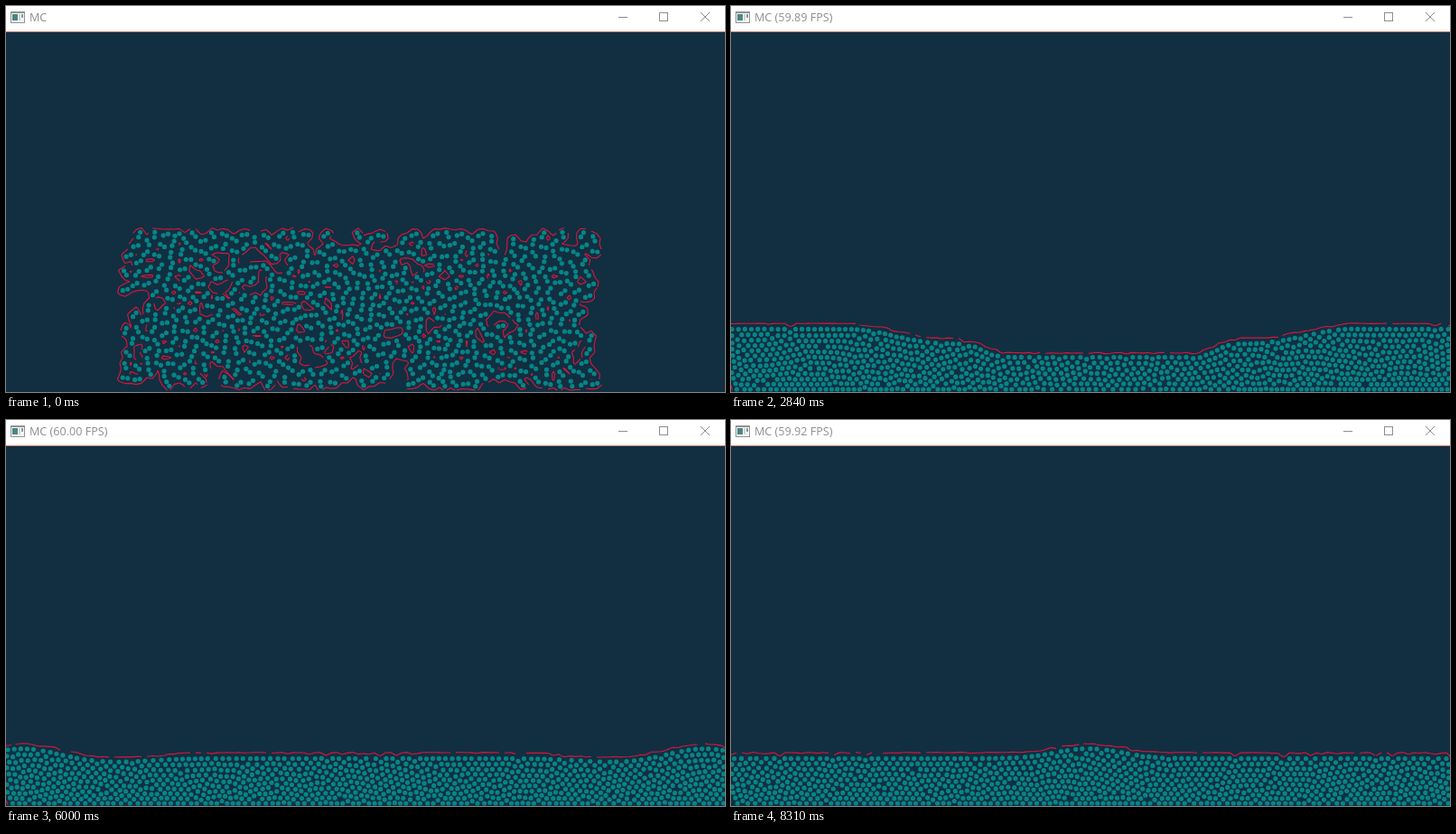
Animation of 796x427 px, one loop 8390 ms. Source, as an HTML page with a canvas:

```html
<!DOCTYPE html>
<html lang="en">
<head>
<meta charset="utf-8">
<title>MC</title>
<style>
  html, body { margin: 0; width: 100%; height: 100%; overflow: hidden; background: #112f41; }
  canvas { position: absolute; left: 0; top: 0; display: block; }
  #title {
    position: absolute; left: 26px; top: 4px; line-height: 18px; white-space: pre;
    font-family: "Open Sans", "Noto Sans", sans-serif; font-size: 12.6px; color: #8e8e8e;
  }
</style>
</head>
<body>
<canvas id="stage" width="796" height="427"></canvas>
<div id="title">MC</div>
<script>
const W = 796, H = 427, LOOP = 8390, STEP = 76.92, FRAMES = 109;
const FLOOR = 424, PAIRS = 520, N = PAIRS * 2, LIFT = 4.5;
const IMPACT = 1230, MEET = 3920, CROSSING = 4390, GRAVITY = 655;
const ctx = document.getElementById('stage').getContext('2d');
const title = document.getElementById('title');

let seed = 20177;
function rand(a = 0, b = 1) {
  seed = (seed * 1664525 + 1013904223) >>> 0;
  return a + (b - a) * seed / 4294967296;
}
const clamp = (v, a, b) => Math.max(a, Math.min(b, v));
const mix = (a, b, u) => a + (b - a) * u;
const bell = (x, mid, width) => Math.exp(-(((x - mid) / width) ** 2));
function smooth(a, b, v) {
  const u = clamp((v - a) / (b - a), 0, 1);
  return u * u * (3 - 2 * u);
}

// Water depth in three stages: the block collapses, the waves
// rebound from the walls, then a pair of crests crosses the tank.
function collapse(x, t) {
  const u = Math.min(t / IMPACT, 1), d = Math.abs(x - 392);
  const pile = mix(176, 95, u ** 1.6) * clamp((mix(264, 300, u) - d) / mix(1, 150, u), 0, 1);
  const film = 28 * u * clamp((mix(264, 430, Math.min(1, t / 850)) - d) / 30, 0, 1);
  const jet = 80 * smooth(850, IMPACT, t) * Math.exp(-Math.min(x, W - x) / 16);
  return Math.max(pile, film) + jet;
}
function rebound(x, t) {
  const d = Math.abs(x - 408), front = Math.max(0, 398 - 0.166 * (t - IMPACT));
  return 40 + 15 / (1 + Math.exp((front - d) / 7)) + 16 * smooth(front + 40, front + 150, d);
}
function crossing(x, t) {
  const d = Math.abs(x - 396), phase = (t - MEET) / CROSSING;
  const c = 398 * Math.abs(((phase * 2 + 9) % 2) - 1);
  const clash = bell(t, MEET, 350);
  const crest = 4 + 7 * Math.abs(Math.cos(phase * Math.PI * 2)) + 19 * clash;
  return 54 + crest * bell(d, c, 50 - 14 * clash) - 4 * bell(d, c - 100, 55);
}
function depth(x, t) {
  let h = t < 2000 ? collapse(x, t) : 0;
  if (t > IMPACT) h = mix(h, rebound(x, t), smooth(IMPACT, 2000, t));
  if (t > 2840) h = mix(h, crossing(x, t), smooth(2840, 3750, t));
  return h;
}

function waterLine(t) {
  const top = new Float64Array(W + 1), sum = new Float64Array(W + 2);
  const rough = 5 * bell(t, IMPACT, 420);
  for (let x = 0; x <= W; x++) {
    const h = depth(x, t);
    const wobble = Math.sin(x * 0.19 + 1) + Math.sin(x * 0.083) + Math.sin(x * 0.31 + 2);
    const y = FLOOR - h + LIFT + wobble * rough * clamp(h / 90, 0, 1);
    top[x] = Math.min(y, FLOOR - 0.01);
    sum[x + 1] = sum[x] + FLOOR - top[x];
  }
  const total = sum[W + 1];
  return { top, sum: sum.map(v => v / total) };
}
const topAt = (line, x) => line.top[clamp(Math.round(x), 0, W)];

// Share of the water left of x, and its inverse.
function share(line, x) {
  const i = clamp(Math.floor(x), 0, W);
  return mix(line.sum[i], line.sum[i + 1], x - i);
}
function place(line, q) {
  let lo = 0, hi = W + 1;
  while (hi - lo > 1) {
    const m = (lo + hi) >> 1;
    if (line.sum[m] <= q) lo = m; else hi = m;
  }
  return lo + (q - line.sum[lo]) / Math.max(line.sum[hi] - line.sum[lo], 1e-9);
}

// One pass of pushing neighbours apart inside a box.
function spread(px, py, reach, gapAt, area) {
  const n = px.length, cols = Math.ceil(W / reach) + 2, rows = Math.ceil(H / reach) + 2;
  const head = new Int32Array(cols * rows).fill(-1), next = new Int32Array(n);
  const cell = i => Math.floor(py[i] / reach) * cols + Math.floor(px[i] / reach);
  const keepIn = i => {
    px[i] = clamp(px[i], area.left, area.right);
    py[i] = clamp(py[i], area.top, area.bottom);
  };
  for (let i = 0; i < n; i++) {
    const c = cell(i);
    next[i] = head[c];
    head[c] = i;
  }
  for (let i = 0; i < n; i++) {
    const c = cell(i), gap = gapAt(py[i]);
    for (let r = -1; r <= 1; r++) for (let s = -1; s <= 1; s++) {
      const k = c + r * cols + s;
      if (k < 0 || k >= head.length) continue;
      for (let j = head[k]; j >= 0; j = next[j]) {
        if (j <= i) continue;
        const dx = px[j] - px[i], dy = py[j] - py[i], d = Math.hypot(dx, dy) || 0.01;
        if (d >= gap) continue;
        const f = 0.28 * (gap - d) / d;
        px[i] -= dx * f; py[i] -= dy * f;
        px[j] += dx * f; py[j] += dy * f;
      }
    }
    keepIn(i);
  }
  for (let i = 0; i < n; i++) keepIn(i);
}

// Loose block of evenly spread pairs.
function fillBlock(px, py) {
  const area = { left: 132, right: 652, top: 253, bottom: 418 };
  const mx = new Float64Array(PAIRS).map(() => rand(area.left, area.right));
  const my = new Float64Array(PAIRS).map(() => rand(area.top, area.bottom));
  for (let n = 0; n < 14; n++) spread(mx, my, 14, () => 13.5, area);
  for (let i = 0; i < N; i++) {
    const m = i >> 1;
    if (i % 2) {
      px[i] = 2 * mx[m] - px[i - 1];
      py[i] = 2 * my[m] - py[i - 1];
    } else {
      const a = rand(0, Math.PI * 2);
      px[i] = mx[m] + Math.cos(a) * 2.8;
      py[i] = my[m] + Math.sin(a) * 2.8;
    }
  }
}

function flow() {
  const out = [], px = new Float64Array(N), py = new Float64Array(N);
  const order = Array.from(px, (_, i) => i);
  const tank = { left: 1, right: W - 1.5, top: 40, bottom: FLOOR };
  const gapAt = y => Math.min(8, 6.3 + 0.014 * (FLOOR - y));
  const inside = x => clamp(x, tank.left, tank.right);
  fillBlock(px, py);
  let line = waterLine(0);
  out.push({ px: px.slice(), py: py.slice(), line });
  for (let k = 1; k < FRAMES; k++) {
    const now = waterLine(k * STEP);
    for (let i = 0; i < N; i++) {
      const x = inside(place(now, share(line, px[i])));
      const grow = (FLOOR - topAt(now, x)) / (FLOOR - topAt(line, px[i]));
      py[i] = FLOOR - (FLOOR - py[i]) * clamp(grow, 0.5, 1.8);
      px[i] = x;
    }
    order.sort((a, b) => px[a] - px[b]);
    order.forEach((i, n) => {
      px[i] = inside(mix(px[i], place(now, (n + 0.5) / N), 0.2));
    });
    for (let n = 0; n < 10; n++) {
      spread(px, py, 8, gapAt, tank);
      for (let i = 0; i < N; i++) {
        py[i] += Math.max(0, topAt(now, px[i]) - py[i]) * 0.4;
      }
    }
    line = now;
    out.push({ px: px.slice(), py: py.slice(), line });
  }
  return out;
}

const frames = flow();

// Spray thrown up by the collapse, described at the top of its flight.
const spray = Array.from({ length: 16 }, (_, i) => ({
  x: 190 + i * 28 + rand(-12, 12), y: rand(270, 325), vy: rand(-50, 50)
}));
function drops(t, line) {
  const s = (t - IMPACT) / 1000;
  if (Math.abs(s) > 0.7) return [];
  return spray
    .map(p => [p.x + (p.x - 395) * 0.25 * s, p.y + p.vy * s + GRAVITY * s * s / 2])
    .filter(([x, y]) => y < topAt(line, x) - 2);
}

// Marching squares over a soft particle field.
const CELL = 6, NX = 134, NY = 67, Y0 = 29, REACH = 8, ISO = 0.33;
function outline(dots, k) {
  const f = new Float32Array(NX * NY);
  for (const [x, y] of dots) {
    const cx = Math.round(x / CELL), cy = Math.round((y - Y0) / CELL);
    for (let r = Math.max(cy - 2, 0); r <= Math.min(cy + 2, NY - 1); r++) {
      for (let c = Math.max(cx - 2, 0); c <= Math.min(cx + 2, NX - 1); c++) {
        const w = 1 - ((c * CELL - x) ** 2 + (r * CELL + Y0 - y) ** 2) / (REACH * REACH);
        if (w > 0) f[r * NX + c] += w * w;
      }
    }
  }
  const ring = [[0, 0], [1, 0], [1, 1], [0, 1]];
  ctx.beginPath();
  for (let r = 0; r < NY - 1; r++) for (let c = 0; c < NX - 1; c++) {
    const hits = [];
    for (let e = 0; e < 4; e++) {
      const [ax, ay] = ring[e], [bx, by] = ring[(e + 1) % 4];
      const a = f[(r + ay) * NX + c + ax], b = f[(r + by) * NX + c + bx];
      if (a > ISO === b > ISO) continue;
      const u = (ISO - a) / (b - a);
      hits.push([(c + mix(ax, bx, u)) * CELL, Y0 + (r + mix(ay, by, u)) * CELL]);
    }
    // Some cells leave a gap in the line.
    const h = Math.sin(c * 12.99 + r * 78.23 + k * 3.7) * 43758.5;
    if (h - Math.floor(h) < 0.1) continue;
    for (let i = 0; i + 1 < hits.length; i += 2) {
      ctx.moveTo(...hits[i]);
      ctx.lineTo(...hits[i + 1]);
    }
  }
  ctx.strokeStyle = '#dc143c';
  ctx.lineWidth = 1.1;
  ctx.stroke();
}

function box(x, y, w, h, color) {
  ctx.fillStyle = color;
  ctx.fillRect(x, y, w, h);
}

function windowBar() {
  box(0, 0, W, 28, '#ffffff');
  box(0, 28, W, 1, '#d97866');
  box(5, 6, 16, 13, '#8f9494');
  box(6, 8, 14, 10, '#f4f4f4');
  box(7, 9, 6, 7, '#4c8583');
  box(14, 9, 2, 7, '#d2d2d2');
  box(17, 9, 2, 4, '#8d9a9c');
  ctx.strokeStyle = '#8e8e8e';
  ctx.lineWidth = 1;
  ctx.strokeRect(723.5, 7.5, 9, 9);
  ctx.beginPath();
  ctx.moveTo(678, 12.5); ctx.lineTo(688, 12.5);
  ctx.moveTo(769, 7); ctx.lineTo(779, 17);
  ctx.moveTo(779, 7); ctx.lineTo(769, 17);
  ctx.stroke();
}

function draw(k) {
  const { px, py, line } = frames[k];
  const dots = Array.from(px, (x, i) => [x, py[i]]).concat(drops(k * STEP, line));
  box(0, 0, W, H, '#112f41');
  ctx.fillStyle = '#068587';
  ctx.beginPath();
  for (const [x, y] of dots) {
    ctx.moveTo(x + 2.6, y);
    ctx.arc(x, y, 2.6, 0, Math.PI * 2);
  }
  ctx.fill();
  outline(dots, k);
  windowBar();
}

function label(t) {
  if (t < 700) return 'MC';
  const fps = t < 1730 ? 53.61 : t < 3700 ? 59.89 : t < 8000 ? 60 : 59.92;
  return `MC (${fps.toFixed(2)} FPS)`;
}

let shown = -1;
const start = performance.now();
function tick() {
  const t = Math.max(0, performance.now() - start) % LOOP;
  const k = Math.min(FRAMES - 1, Math.floor((t + 8) / STEP));
  if (k !== shown) {
    shown = k;
    draw(k);
    title.textContent = label(k * STEP);
  }
  requestAnimationFrame(tick);
}
tick();
</script>
</body>
</html>
```
